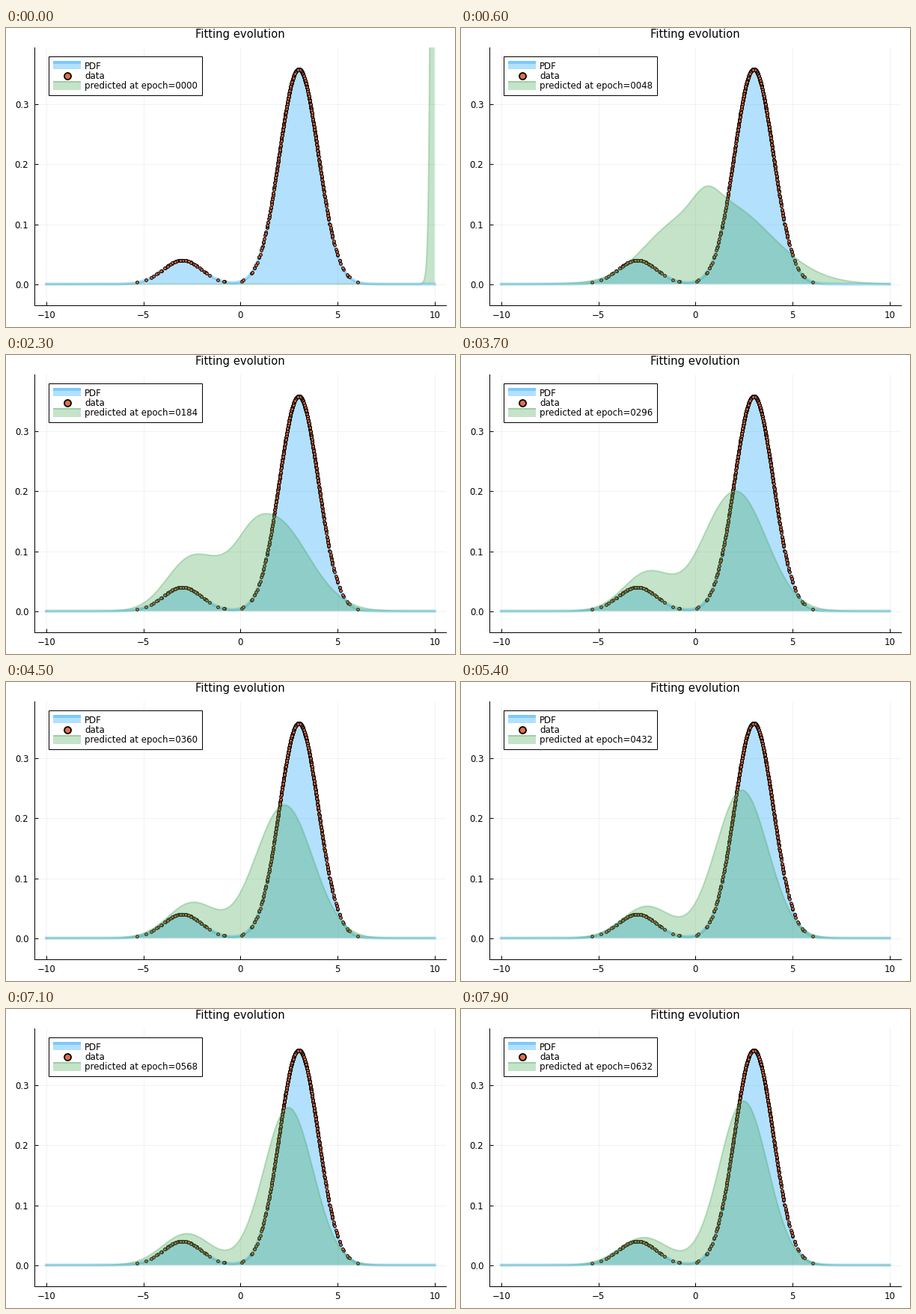
Recreate the animation shown at these times as a matplotlib script. Size 600 px wide and 400 px high, loop 8 s.

```python
import numpy as np
import matplotlib.pyplot as plt
from matplotlib.animation import FuncAnimation
from matplotlib.patches import Rectangle

W, H, DPI = 600, 400, 100
FRAMES, STEP_MS, EPOCHS_PER_FRAME = 80, 100, 8
BLUE, ORANGE, GREEN = "#009AFA", "#E36F47", "#3EA44E"
ALPHA = 0.3
ROOT = np.sqrt(2 * np.pi)


def pt(px):
    return px * 72 / DPI


plt.rcParams.update({"font.family": "DejaVu Sans", "font.size": pt(11.8)})


def bell(x, height, mu, sigma):
    return height * np.exp(-0.5 * ((x - mu) / sigma) ** 2)


def pdf(x):
    return bell(x, 0.9 / ROOT, 3, 1) + bell(x, 0.1 / ROOT, -3, 1)


xs = np.linspace(-10, 10, 801)
dx = xs[1] - xs[0]

# Training milestones: heights of both bumps and the left mean
SETTLE = 6
MILESTONES = [SETTLE, 23, 37, 54, 63, 79]
RIGHT_HEIGHT = [0.137, 0.158, 0.200, 0.247, 0.252, 0.274]
LEFT_HEIGHT = [0.021, 0.081, 0.064, 0.053, 0.059, 0.046]
LEFT_MEAN = [-1.9, -2.6, -2.45, -2.5, -2.87, -2.65]
LEFT_SIGMA, MID_MEAN, MID_SIGMA = 1.26, 0.55, 0.65


def mixture(i):
    right, left, left_mean = (np.interp(i, MILESTONES, v) for v in
                              (RIGHT_HEIGHT, LEFT_HEIGHT, LEFT_MEAN))
    mid = 0.038 * np.exp(-i / 20)
    mean = 2.48 - 1.23 * np.exp(-((i - SETTLE) / 29.4) ** 2)
    # The right bump takes the probability the others leave
    rest = 1 - ROOT * (left * LEFT_SIGMA + mid * MID_SIGMA)
    return (bell(xs, right, mean, rest / (right * ROOT))
            + bell(xs, left, left_mean, LEFT_SIGMA)
            + bell(xs, mid, MID_MEAN, MID_SIGMA))


def predicted(i):
    if i >= SETTLE:
        return mixture(i)
    # Early epochs: a steep exponential against the right edge relaxes
    w = i / SETTLE
    log_y = w * np.log(mixture(SETTLE)) + 14 * (1 - w) ** 3 * (xs - 10)
    ys = np.exp(log_y - log_y.max())
    return ys / ((ys.sum() - (ys[0] + ys[-1]) / 2) * dx)


def sample(n=500):
    rng = np.random.default_rng(4)
    cdf = np.cumsum(pdf(xs)) * dx
    spread = rng.uniform(-0.4, 1.4, n)
    spread[[0, -1]] = 0.5
    points = np.interp((np.arange(n) + spread) / n, cdf, xs + dx / 2)
    return rng.permutation(points)


fig = plt.figure(figsize=(W / DPI, H / DPI), dpi=DPI, facecolor="white")

L, R, T, B = 38.3, 588.3, 26, 370.8
ZERO, UNIT = 342.6, 801
ax = fig.add_axes([L / W, 1 - B / H, (R - L) / W, (B - T) / H])
ax.set_xlim(-10.6, 10.6)
ax.set_ylim((ZERO - B) / UNIT, (ZERO - T) / UNIT)
ax.set_xticks(np.arange(-10, 11, 5))
ax.set_yticks(np.arange(4) / 10)
ax.set_axisbelow(True)
ax.grid(color="black", alpha=0.07, lw=0.5)
ax.tick_params(direction="in", length=pt(5), width=pt(1))
ax.tick_params(axis="x", pad=pt(7))
ax.tick_params(axis="y", pad=pt(8))
ax.spines[["top", "right"]].set_visible(False)
ax.spines[["left", "bottom"]].set_linewidth(pt(1))


def outline(ys):
    return np.r_[xs[0], xs, xs[-1]], np.r_[0, ys, 0]


def area(ys, color, width, z):
    fill, = ax.fill(*outline(ys), color=color, alpha=ALPHA, lw=0, zorder=z)
    line, = ax.plot(xs, ys, color=color, alpha=ALPHA, lw=pt(width),
                    zorder=z + 0.1)
    return fill, line


area(pdf(xs), BLUE, 4, 3)
points = sample()
ax.plot(points, pdf(points), "o", ms=pt(3.8), mfc=ORANGE, mec="black",
        mew=pt(0.95), zorder=4)
fill, line = area(predicted(0), GREEN, 2, 5)

# Title and legend in pixel coordinates
top = fig.add_axes([0, 0, 1, 1])
top.set_xlim(0, W)
top.set_ylim(H, 0)
top.axis("off")
top.text(313.3, 13, "Fitting evolution", size=pt(14.7), ha="center")
top.add_patch(Rectangle((57, 38), 205, 51.6, fc="white", ec="black",
                        lw=pt(1)))


def swatch(y, color, width):
    top.add_patch(Rectangle((63, y), 37, 12 - width / 4, color=color,
                            alpha=ALPHA, lw=0))
    mid = y + width / 2
    top.plot([63, 100], [mid, mid], color=color, alpha=ALPHA, lw=pt(width),
             solid_capstyle="butt")


swatch(44, BLUE, 4)
top.plot(81.6, 63.8, "o", ms=pt(9), mfc=ORANGE, mec="black", mew=pt(1.8))
swatch(71, GREEN, 2)
top.text(105, 55, "PDF")
top.text(105, 68.3, "data")
label = top.text(105, 81.4, "")


def update(i):
    ys = predicted(i)
    fill.set_xy(np.c_[outline(ys)])
    line.set_ydata(ys)
    label.set_text(f"predicted at epoch={i * EPOCHS_PER_FRAME:04d}")
    return fill, line, label


anim = FuncAnimation(fig, update, frames=FRAMES, interval=STEP_MS,
                     repeat=True, repeat_delay=0)
plt.show()
```
